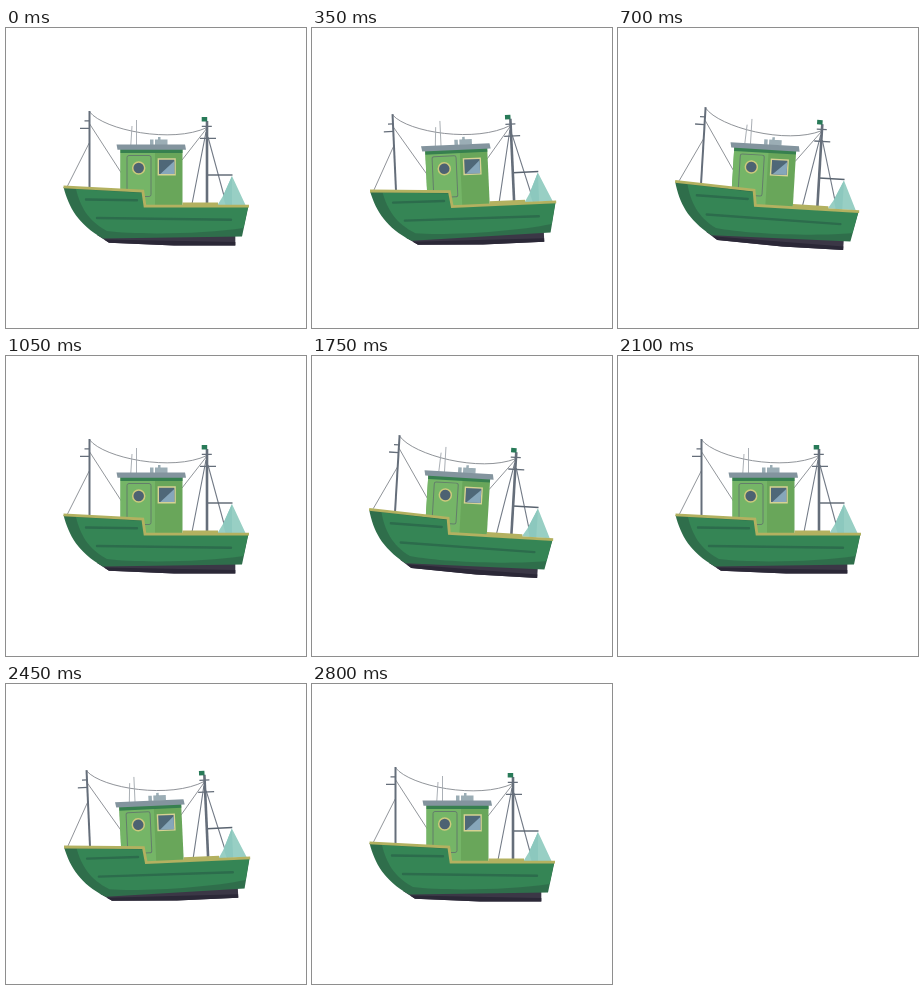
Animation of 300 by 300 pixels, one loop 3150 ms. Source, as an HTML page:

```html
<!DOCTYPE html>
<html lang="en">
<head>
<meta charset="utf-8">
<title>Rocking boat</title>
<style>
  html, body { margin: 0; width: 100%; height: 100%; overflow: hidden; background: #fff; }
  svg { display: block; width: 100vw; height: 100vh; }
</style>
</head>
<body>
<svg viewBox="0 0 300 300">
  <g id="boat" fill="none">
    <!-- rigging -->
    <g stroke="#85898f" stroke-width=".9">
      <path d="M83.700 84C98 102 166 116 201 99.500"/>
      <path d="M83.700 96L116 146M83.200 115L61.500 158M201 100L176 132"/>
      <path d="M200 104L186 176M202 109L220.500 177" stroke="#737b87" stroke-width="1.100"/>
    </g>
    <!-- net and boom -->
    <path d="M226 148L239.500 177H211.500L217 168Z" fill="#98cfc4"/>
    <path d="M226 148L217 168L219.500 177H226Z" fill="#8cc8be"/>
    <path d="M201 147H226.500" stroke="#59636f" stroke-width="1.400"/>
    <!-- masts -->
    <g stroke="#656e7a">
      <path d="M83.500 83V159" stroke-width="2"/>
      <path d="M201 93V177" stroke-width="2.600"/>
      <path d="M78.500 92.800H83.500M74 100.400H83.500M195.800 98.300H205.800M194 110.300H210" stroke-width="1.300"/>
    </g>
    <path d="M195.700 89H201.200V93.500H195.700Z" fill="#287a58"/>
    <!-- roof gear -->
    <path d="M126 98L124.800 117M130.500 92V117" stroke="#a2a8ae" stroke-width=".9"/>
    <path d="M144 111.500H147.500V117H144ZM149 111.500H161.500V117H149ZM152 109H154.500V112H152Z" fill="#9badb5"/>
    <!-- cabin -->
    <path d="M114.500 120H176.500V180H114.500Z" fill="#69a65a"/>
    <path d="M114.500 120H149V180H114.500Z" fill="#75b567"/>
    <path d="M114.500 121H176.500V125H114.500Z" fill="#37804f"/>
    <path d="M110.500 116.500H179L180 121.800H111.500Z" fill="#83949e"/>
    <rect x="121" y="127.500" width="24" height="41" rx="2" stroke="#637d6b" stroke-width="1"/>
    <circle cx="132.700" cy="140" r="6" fill="#4d6272" stroke="#cdca7c" stroke-width="1.500"/>
    <path d="M152.300 131H169.100V146.700H152.300Z" fill="#4f6878" stroke="#d6d293" stroke-width="1.400"/>
    <path d="M168.300 133V146H154.300Z" fill="#86a6ba"/>
    <!-- hull -->
    <path d="M91 207H229.300V217.500H168L103 214.800Z" fill="#3b3746"/>
    <path d="M98 211.500L229.300 214V217.500H168L103 214.800Z" fill="#2b2837"/>
    <path d="M57.500 159L137 164L139 178H242.500L236 208.500L97 210.500C72 196 63 180 57.500 159Z" fill="#2f6e4b"/>
    <path d="M70 161L137 165L139 179H242L237.500 200C200 206 130 207 101 203C82 193 74 178 70 161Z" fill="#358555"/>
    <path d="M57.500 158.800L136.800 163L139 178.200H243" stroke="#b3b160" stroke-width="2.800"/>
    <path d="M176.500 176H212" stroke="#b3b160" stroke-width="3"/>
    <path d="M80 171.500L131 172.200M91 190L225 191.700" stroke="#2c6c4c" stroke-width="2.400" stroke-linecap="round"/>
  </g>
</svg>
<script>
  const boat = document.getElementById('boat');
  const level = 0, bowDown = -2.6, bowUp = 3.4;
  const poses = [level, bowDown, bowUp, level, bowDown, bowUp, level, bowDown, level];
  const hold = 350;

  function draw(now) {
    const step = Math.floor(now / hold) % poses.length;
    boat.setAttribute('transform', `rotate(${poses[step]} 150 150)`);
    requestAnimationFrame(draw);
  }
  draw(0);
</script>
</body>
</html>
```
